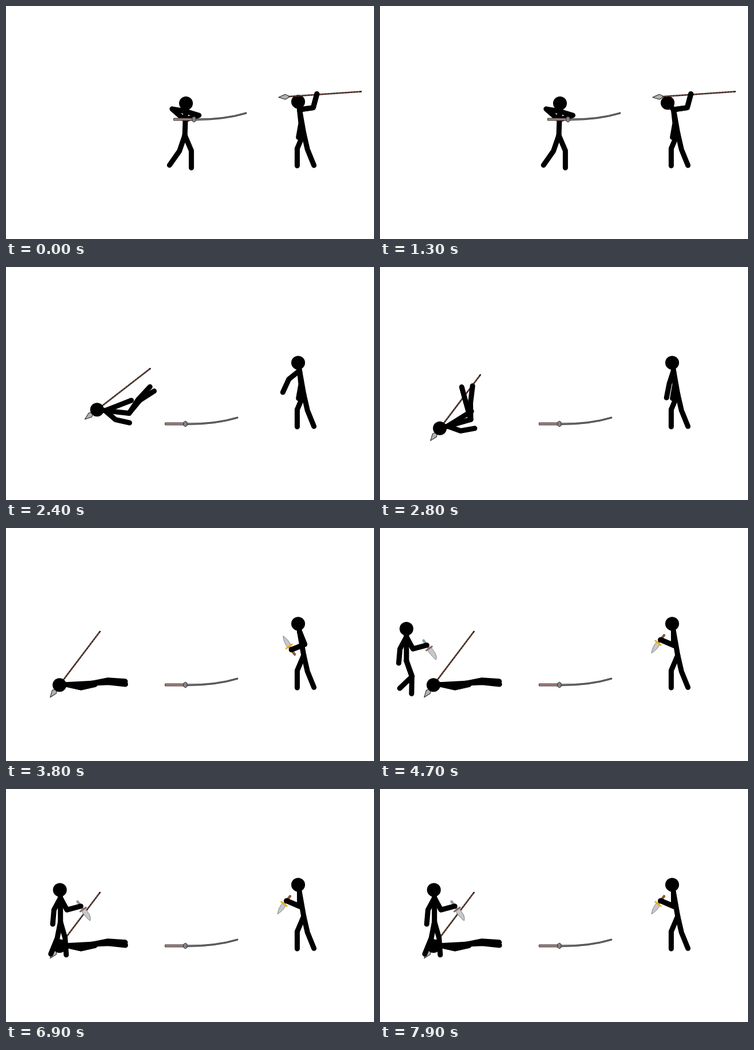
Write an HTML page with a canvas that moves like this. It is 640 by 407 pixels and loops after 8000 ms.

```html
<!DOCTYPE html>
<html lang="en">
<head>
<meta charset="utf-8">
<title>Stick duel</title>
<style>
html, body { margin: 0; width: 640px; height: 407px; overflow: hidden; background: #fff; }
canvas { display: block; }
</style>
</head>
<body>
<canvas id="stage" width="640" height="407"></canvas>
<script>
const ctx = document.getElementById('stage').getContext('2d');
const STEP = 100, STEPS = 80;
const BONE = { neck: 14, torso: 42, arm: [24, 25], leg: [29, 30] };

// A pose is the neck position plus the angle of each bone in degrees (0 right, 90 down).
const fencing = { neck: [312.5, 184], torso: 92, armA: [190, 41], armB: [17, 162], legA: [109, 125], legB: [67, 90], spear: -4 };
const struck = { neck: [295.6, 189.8], torso: 56.5, armA: [88, 65], armB: [3, 2], legA: [55, 82], legB: [40, 80], spear: -4 };
const landed = { neck: [117.5, 278], torso: -16, armA: [20, -10], armB: [-32, -32], legA: [-106, -105], legB: [-91, -83], spear: -53 };
const lying = { neck: [107, 273.5], torso: -3, armA: [13, -13], armB: [13, -13], legA: [-11, 4], legB: [-3, 6], spear: -53 };

const aiming = { neck: [510.5, 181], torso: 80, armA: [-8, -75], armB: [84, 100], legA: [113, 90], legB: [77, 68], knife: 290 };
const thrown = { ...aiming, armA: [-112, -202] };
const relaxed = { ...aiming, armA: [-252, -259] };
const reaching = { ...aiming, armA: [-290, -315], armB: [70, 120] };
const knifeUp = { ...aiming, armA: [-292, -202], armB: [68, 158], knife: 235 };
const knifeDown = { ...aiming, armA: [-271, -157], armB: [89, 203], knife: 128 };

const passing = { neck: [0, 190], torso: 90, armA: [118, 95], armB: [62, -15], legA: [71, 91], legB: [70, 136] };
const stride = { ...passing, legA: [101, 112], legB: [74, 86] };
const otherStride = { ...stride, legA: stride.legB, legB: stride.legA };

const clamp = (v, lo = 0, hi = 1) => Math.min(hi, Math.max(lo, v));
const part = (s, from, to) => clamp((s - from) / (to - from));
const easeOut = u => 1 - (1 - u) ** 1.7;
const polar = ([x, y], angle, r) => {
  const a = angle * Math.PI / 180;
  return [x + r * Math.cos(a), y + r * Math.sin(a)];
};

// Blends numbers, arrays or whole poses.
function mix(a, b, u) {
  if (typeof a === 'number') return a + (b - a) * u;
  if (Array.isArray(a)) return a.map((v, i) => mix(v, b[i], u));
  return Object.fromEntries(Object.keys(a).map(k => [k, mix(a[k], b[k], u)]));
}

const act = (s, first, ...moves) =>
  moves.reduce((pose, [from, to, next]) => mix(pose, next, easeOut(part(s, from, to))), first);

const victimAt = s => act(s, fencing, [18, 20, struck], [20, 28, landed], [29, 36, lying]);

const throwerAt = s => act(s, aiming, [14, 19, thrown], [20, 27, relaxed],
  [32, 35, reaching], [35, 38, knifeUp], [41, 45, knifeDown]);

function walkerAt(s) {
  const u = clamp((s - 47) / 3, -2, 1);
  const pose = mix(passing, u < 0 ? otherStride : stride, Math.min(1, Math.abs(u)));
  return { ...pose, neck: [46 + u * 48.7, 190] };
}

// One sideways nod of the head, out and back.
const nod = (s, from, length, size) => size * Math.sin(Math.PI * part(s, from, from + length));
const victimNod = s => nod(s, 0, 9, -3);
const throwerNod = s => nod(s, 0, 8, 2) + nod(s, 8, 9, -8) + nod(s, 59, 10, 5) + nod(s, 69, 10, -3);
const walkerNod = s => nod(s, 50, 5, 3) + nod(s, 55, 4, -4) + part(s, 58, 59) - 2 * part(s, 60, 68);

const headOf = p => polar(p.neck, p.torso, -BONE.neck);

function joints(start, angles, lengths) {
  const points = [start];
  angles.forEach((a, i) => points.push(polar(points[i], a, lengths[i])));
  return points;
}

function line(points, width = 9, color = '#000') {
  ctx.beginPath();
  points.forEach(p => ctx.lineTo(...p));
  ctx.lineWidth = width;
  ctx.strokeStyle = color;
  ctx.stroke();
}

function dashes(from, to, width, color) {
  ctx.setLineDash([3, 2]);
  line([[from, 0], [to, 0]], width, color);
  ctx.setLineDash([]);
}

function shape(path, fill, stroke = '#222', width = 1) {
  const p = new Path2D(path);
  ctx.fillStyle = fill;
  ctx.fill(p);
  ctx.strokeStyle = stroke;
  ctx.lineWidth = width;
  ctx.stroke(p);
}

function local([x, y], degrees, draw) {
  ctx.save();
  ctx.translate(x, y);
  ctx.rotate(degrees * Math.PI / 180);
  draw();
  ctx.restore();
}

const arm = (p, side) => joints(p.neck, p['arm' + side], BONE.arm);

function figure(p, sway) {
  const hip = polar(p.neck, p.torso, BONE.torso);
  const [x, y] = headOf(p), head = [x + sway, y + Math.abs(sway) / 4];
  line([head, p.neck, hip]);
  line(arm(p, 'A'));
  line(arm(p, 'B'));
  line(joints(hip, p.legA, BONE.leg));
  line(joints(hip, p.legB, BONE.leg));
  ctx.fillStyle = '#000';
  ctx.beginPath();
  ctx.arc(...head, 12, 0, 7);
  ctx.fill();
}

// The spear flies at the victim's head and stays stuck in it.
function spear(s, victim) {
  const stuck = polar(headOf(victim), victim.spear, -27);
  local(mix([474, 159.5], stuck, part(s, 14, 19) ** 2), victim.spear, () => {
    line([[17, 0], [144, 0]], 2.6, '#1c100c');
    dashes(18, 143, 1.1, '#96604c');
    shape('M0 0 L12 -4.5 L18 -1 L18 1 L12 4.5 Z', '#aeb4ae');
  });
}

function sword(s) {
  const fall = part(s, 18, 20.6);
  local([292 - 15 * fall ** 3, 198 + 76 * fall ** 2], 0, () => {
    shape('M38 -1 Q86 0 126 -12 L126 -10 Q88 1.5 38 1.5 Z', '#a4a4a4', '#111');
    shape('M0 -2 H32 V2 H0 Z', '#8c8484', '#4a3a3a');
    dashes(2, 31, 1.2, '#d07870');
    shape('M32 -3 L35 -5 L38 -3 L38 3 L35 5 L32 3 Z', '#858588', '#333');
  });
}

function knife(hand, angle, flip, guard, grip, blade) {
  local(hand, angle, () => {
    ctx.scale(1, flip);
    line([[-10, 0], [6, 0]], 4.5, grip);
    shape(blade, '#c6c8ca', '#777', 0.8);
    line([[7, -6], [7, 6]], 3, guard);
  });
}

function random(seed) {
  return () => (seed = seed * 16807 % 2147483647) / 2147483647;
}

function blood([x, y], spread) {
  const rnd = random(77);
  ctx.strokeStyle = '#e00c0c';
  ctx.lineWidth = 1.7;
  for (let i = 0; i < 12; i++) {
    const px = x - (14 + i * 2.7) * spread, py = y - 3 + rnd() * 14, bend = rnd() * 6 - 3;
    ctx.beginPath();
    ctx.moveTo(px - 1.5, py);
    ctx.quadraticCurveTo(px, py + bend, px + 1.5, py + bend / 2);
    ctx.stroke();
  }
}

function draw(s) {
  ctx.fillStyle = '#fff';
  ctx.fillRect(0, 0, 640, 407);
  ctx.lineCap = ctx.lineJoin = 'round';

  const thrower = throwerAt(s), victim = victimAt(s);
  if (s >= 36) {
    knife(arm(thrower, 'A')[2], thrower.knife, thrower.knife > 180 ? 1 : -1, '#e8b020', '#8a5a3c',
      'M7 -3 Q18 -4 28 2 Q18 6 7 4 Z');
  }
  figure(thrower, throwerNod(s));
  spear(s, victim);
  if (s < 17) line(arm(thrower, 'A'));
  figure(victim, victimNod(s));
  if (s >= 19 && s <= 22) blood(headOf(victim), 0.6 + (s - 18) * 0.2);
  sword(s);

  if (s >= 42) {
    const walker = walkerAt(s);
    knife(arm(walker, 'B')[2], 55, 1, '#806a66', '#8b9aa4', 'M7 -4 L20 -4 Q27 -3 30 1 Q27 4 7 4 Z');
    figure(walker, walkerNod(s));
  }
}

let last = -1;
const start = performance.now();
function tick() {
  const s = Math.floor((performance.now() - start) / STEP) % STEPS;
  if (s !== last) draw(last = s);
  requestAnimationFrame(tick);
}
tick();
</script>
</body>
</html>
```
